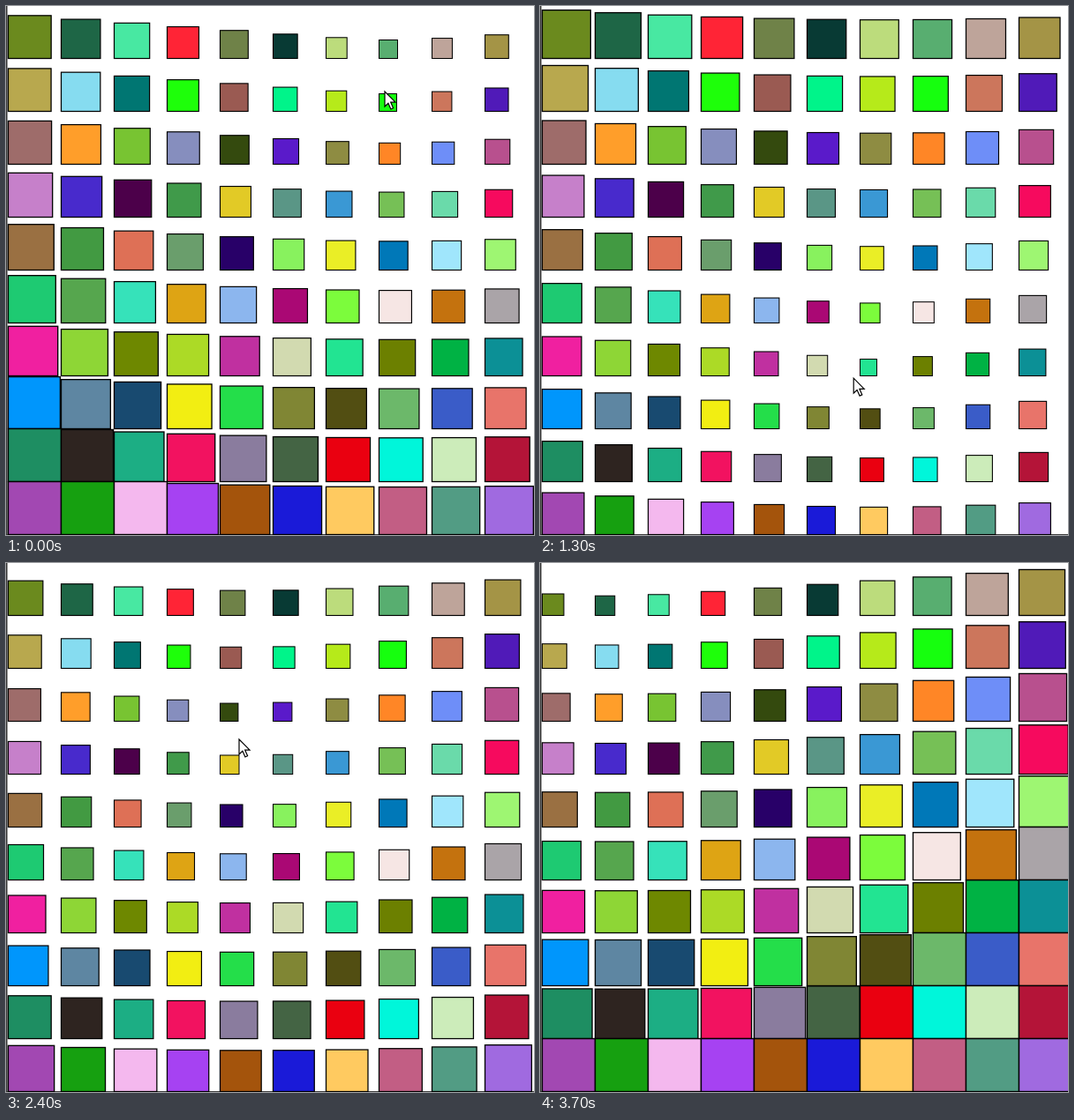
An HTML page for the animation above (4000 ms loop, 598x600 px).

```html
<!DOCTYPE html>
<html lang="en">
<head>
<meta charset="utf-8">
<title>Squares growing away from the pointer</title>
<style>
html, body { margin: 0; width: 100%; height: 100%; overflow: hidden; background: #fff; }
svg { display: block; }
</style>
</head>
<body>
<svg id="stage" width="598" height="600" viewBox="0 0 598 600">
  <path d="M0 0H1.6V599H598V600H0Z" fill="#3c3c3c"/>
  <g id="squares" stroke="#000"></g>
  <path id="pointer" d="M0 0V17L3.9 13.3L6.9 20L9.6 18.8L6.7 12.2H12Z" fill="#fff" stroke="#000" stroke-width="1.2"/>
</svg>
<script>
const LOOP = 4000, TICK = 100, CELL = 60;
const LEFT = 2.5, BOTTOM = 59.5;          // corner of the first square
const BASE = 18.3, GROWTH = 0.0709;       // side = BASE + GROWTH * distance
const POINTER_LEAD = 30, POINTER_GONE = 3700;

const palette = [
  '6b8a1e 1e6646 48e8a2 ff2436 6f8248 083a34 bcdc7c 58ae70 bea49a a49446',
  'b8a84e 86dcf0 007672 1eff0a 9a5a52 00f48a b6ea1a 16ff0e cc765c 501ab8',
  '9e6c6a ff9e2a 78c432 868ebe 344a0e 5a1aca 8e8c42 ff8626 6e8ef8 b8508e',
  'c680ca 482acc 4c004a 409a4a e2ca26 5a9686 3a98d4 76c056 6adaaa f60a5e',
  '9a7042 429a42 de7056 6a9e6c 280068 88f25e eaee26 0078b8 a0e6fc 9ef672',
  '1eca72 56a64e 36e2ba dea414 8cb6ee aa0874 7cfc3c f6e6e4 c4720e aaa4a8',
  'f020a0 8ed636 6e8800 acda26 c030a0 d2dab0 22e492 6c8000 00b244 0c9096',
  '0096fc 5e86a2 184a70 f2ee12 24de4a 808634 524e12 6cb86a 3a5cc8 e8746a',
  '1e8e62 2e2420 1cae84 f21260 8a7c9e 446444 ea0010 00f6da ccecba b41438',
  'a248b2 16a010 f4b8ee a642f2 a4540c 1a1ad8 ffca60 c25e84 529c84 a06ae0'
].join(' ').split(' ');

// Pointer route: time, x, y
const route = [
  [50, 429, 97], [350, 495, 175], [600, 470, 268], [1000, 470, 396],
  [1300, 372, 419], [1500, 260, 440], [1650, 130, 530], [1800, 234, 558],
  [2000, 320, 460], [2400, 264, 200], [2650, 264, 200], [3200, 86, 92],
  [3400, 74, 34], [3550, 74, 34], [3650, 70, 4]
];

function pointerAt(t) {
  const next = route.findIndex(p => p[0] > t);
  const b = route.at(next);
  const a = next > 0 ? route[next - 1] : b;
  const k = a === b ? 0 : (t - a[0]) / (b[0] - a[0]);
  return [a[1] + (b[1] - a[1]) * k, a[2] + (b[2] - a[2]) * k];
}

function set(el, attrs) {
  for (const name in attrs) el.setAttribute(name, attrs[name]);
}

const group = document.getElementById('squares');
const pointer = document.getElementById('pointer');

const squares = palette.map((color, i) => {
  const el = document.createElementNS('http://www.w3.org/2000/svg', 'rect');
  set(el, { fill: '#' + color });
  group.append(el);
  return { el, x: LEFT + i % 10 * CELL, y: BOTTOM + Math.floor(i / 10) * CELL };
});

function draw(time) {
  const t = Math.floor(time % LOOP / TICK) * TICK;
  const [mx, my] = pointerAt(t);

  // Each square grows from its bottom left corner.
  for (const { el, x, y } of squares) {
    const side = Math.min(CELL, BASE + GROWTH * Math.hypot(x - mx, y - my));
    set(el, {
      x, y: y - side, width: side, height: side,
      'stroke-width': 0.8 + 0.01 * side
    });
  }

  set(pointer, {
    transform: `translate(${pointerAt(t + POINTER_LEAD)})`,
    visibility: t < POINTER_GONE ? 'visible' : 'hidden'
  });
}

const start = performance.now();
function frame() {
  draw(performance.now() - start);
  requestAnimationFrame(frame);
}
frame();
</script>
</body>
</html>
```
